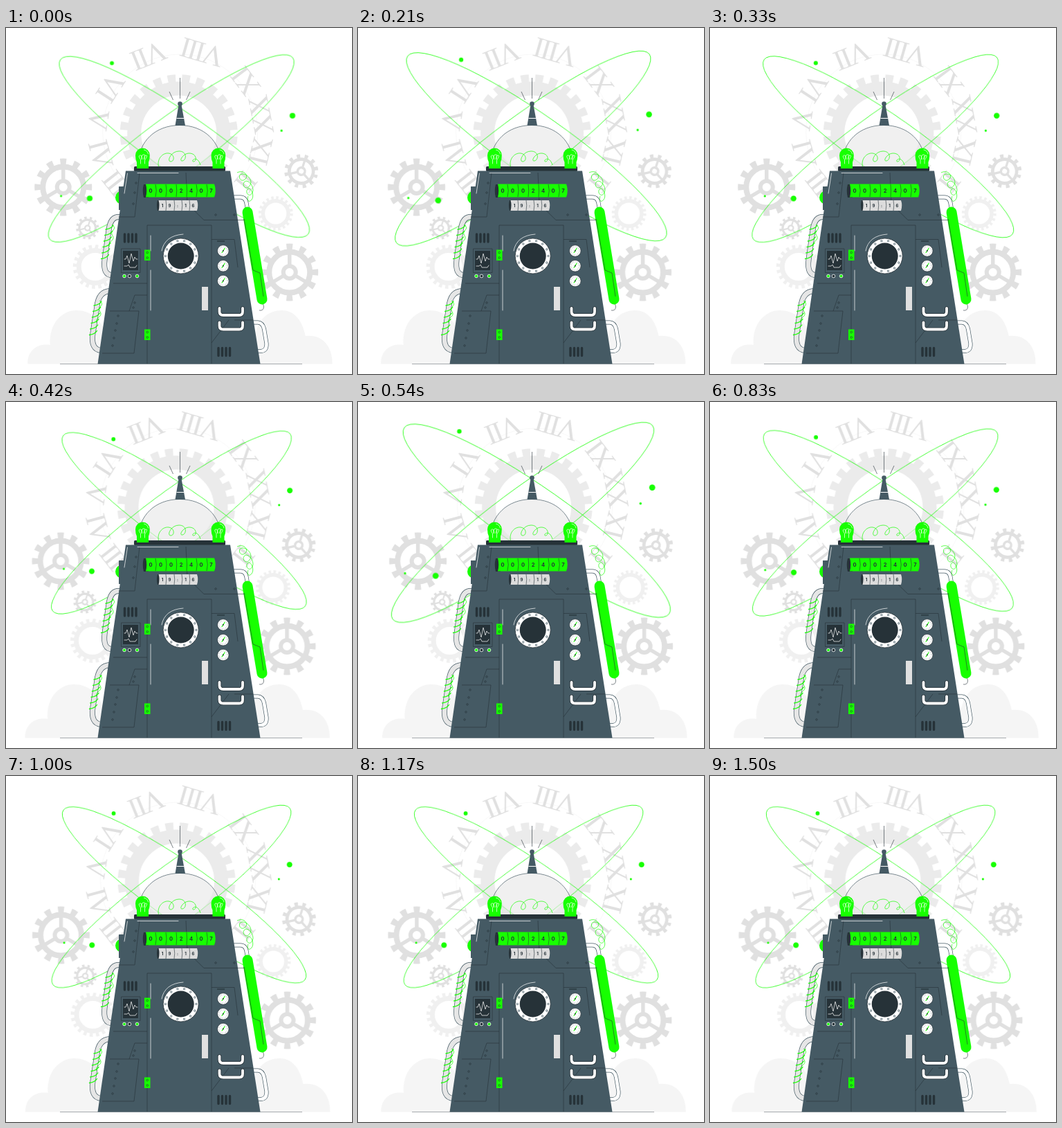
These frames come from a looping animation (500x500 px, 1.54 s). An HTML page without scripts:

```html
<!DOCTYPE html>
<html lang="en">
<head>
<meta charset="utf-8">
<title>Time machine</title>
<style>
  html, body { margin: 0; width: 100%; height: 100%; overflow: hidden; background: #fff; }
  svg { display: block; width: 100vw; height: 100vh; }

  .shake { animation: shake 1540ms cubic-bezier(.34, .07, .4, 1) -40ms infinite; }
  .beat { transform-origin: 250px 174px; animation: beat 1540ms linear -40ms infinite; }
  @keyframes shake {
    0%, 100% { transform: translateX(0); }
    10%, 90% { transform: translateX(-1px); }
    20%, 80% { transform: translateX(2px); }
    30%, 50%, 70% { transform: translateX(-4px); }
    40%, 60% { transform: translateX(4px); }
  }
  @keyframes beat {
    0%, 29.7%, 63%, 100% { transform: scale(1); }
    10%, 38% { transform: scale(1.1); }
  }

  .line { fill: none; stroke: #263238; stroke-width: .6; }
  .thin { fill: none; stroke: #17ff00; stroke-width: .7; }
  .coil { fill: none; stroke: #17ff00; stroke-width: 1.3; stroke-linecap: round; }
  .shine { fill: none; stroke: #fff; stroke-width: .7; stroke-linecap: round; }
  .green { fill: #17ff00; }
  .dark { fill: #263238; }
  .slate { fill: #455a64; }
  .numerals { font: 42px "Liberation Serif", serif; letter-spacing: -3px; fill: #e0e0e0; text-anchor: middle; }
  .digits { font: 700 7.5px Inter, sans-serif; fill: #263238; text-anchor: middle; }
  .small { font-size: 6px; }
  .tube { fill: none; }
</style>
</head>
<body>
<svg viewBox="0 0 500 500">
  <defs>
    <g id="wheel" fill="none" stroke="#e0e0e0">
      <circle r="29.5" stroke-width="8"/>
      <circle r="37" stroke-width="9" pathLength="12" stroke-dasharray=".45 .55" stroke-dashoffset=".225"/>
      <circle r="9" stroke-width="6"/>
      <path d="M0-11V-27M9.5 5.5 23 13.5M-9.5 5.5-23 13.5" stroke-width="5.5"/>
    </g>
    <g id="cog" fill="none" stroke="#f0f0f0">
      <circle r="23.5" stroke-width="7"/>
      <circle r="29" stroke-width="6" pathLength="20" stroke-dasharray=".5 .5"/>
    </g>
    <g id="bulb">
      <path class="green" d="M-8.5 203V194Q-10.5 190-10.5 184A10.3 10.5 0 0 1 10.3 184Q10.3 190 8.5 194V203Z"/>
      <path d="M-3 196V190Q-7 185-4 184T-1 190Q-3 184 1 183T2 190Q2 184 5 184T3 191V196" class="shine"/>
      <path d="M2 176Q7 177 8 182" class="shine"/>
    </g>
    <g id="gauge">
      <circle r="8.3" fill="#fff" stroke="#263238" stroke-width=".7"/>
      <circle r="6" fill="none" stroke="#9aa5aa" stroke-width="1.2" stroke-dasharray=".7 1.8"/>
      <path d="M-2 3 2.5-4" stroke="#17ff00" stroke-width="1.2"/>
      <circle r="1" class="dark"/>
    </g>
    <path id="bar" d="M308.500 405V410Q308.500 415 314 415H337Q342 415 342 410V405" fill="none" stroke-linecap="round"/>
    <g id="grip">
      <use href="#bar" stroke="#263238" stroke-width="5.5"/>
      <use href="#bar" stroke="#fff" stroke-width="3.8"/>
    </g>
    <path id="vents" d="M2 2V13M7.500 2V13M13 2V13M18.500 2V13" stroke="#263238" stroke-width="3.4" stroke-linecap="round"/>
    <g id="hinge">
      <rect width="8.5" height="15.5" class="green"/>
      <circle cx="4.2" cy="4" r="1.4" class="line"/>
      <circle cx="4.2" cy="11.5" r="1.4" class="line"/>
    </g>
    <path id="pipeTop" d="M164 273Q152 272 149 289L142.500 335Q140 357 153 357"/>
    <path id="pipeLow" d="M150 380Q134 381 131.500 402L125.500 441Q122 465 138 466"/>
    <path id="pipeRight" d="M328 244.500H338Q347 244 348 256L350 266M357 425.500H364Q371 426 373 435L376.500 456Q377 466 369 467H362"/>
    <path id="wraps" class="coil" d="M0 0q8-1 11-6m-12.300 14.500q8-1 11-6m-12.300 14.500q8-1 11-6m-12.300 14.500q8-1 11-6m-12.300 14.500q8-1 11-6m-12.300 14.500q8-1 11-6"/>
    <path id="loose" class="thin" d="M0 0q6 4 2 8t-1 8t-2 8t-3 8"/>
  </defs>

  <g class="shake">
    <path fill="#f5f5f5" d="M31.500 485.500C31 466 46 455 64 458C62 426 82 408 102 408C122 408 137 420 145 442L160 485.500Z"/>
    <path fill="#f5f5f5" d="M472 485.500C472 458 456 442 433 445C428 420 415 408 399 408C380 408 366 420 361 440L340 485.500Z"/>
    <circle cx="252" cy="150" r="112" fill="none" stroke="#f8f8f8"/>
    <g class="numerals" transform="translate(252 150)">
      <text transform="rotate(-128) translate(0 -133) rotate(180)">III</text>
      <text transform="rotate(-105) translate(0 -133) rotate(180)">IV</text>
      <text transform="rotate(-81) translate(0 -133) rotate(180)">V</text>
      <text transform="rotate(-57) translate(0 -133) rotate(180)">VI</text>
      <text transform="rotate(-22) translate(0 -133) rotate(180)">VII</text>
      <text transform="rotate(16) translate(0 -133) rotate(180)">VIII</text>
      <text transform="rotate(53) translate(0 -133) rotate(180)">XI</text>
      <text transform="rotate(79) translate(0 -133) rotate(180)">XX</text>
      <text transform="rotate(104) translate(0 -133) rotate(180)">IX</text>
      <text transform="rotate(128) translate(0 -133) rotate(180)">II</text>
    </g>
    <g transform="translate(250 152)" fill="none" stroke="#ebebeb">
      <circle r="64.5" stroke-width="20"/>
      <circle r="79" stroke-width="12" pathLength="24" stroke-dasharray=".55 .45" stroke-dashoffset="-.225"/>
    </g>
    <use href="#cog" transform="translate(129 345)"/>
    <use href="#cog" transform="translate(390 268) scale(.78)"/>
    <use href="#wheel" transform="translate(83 230)"/>
    <use href="#wheel" transform="translate(410 353)"/>
    <use href="#wheel" transform="translate(427 207) rotate(18) scale(.59)"/>
    <use href="#wheel" transform="translate(118 289) rotate(18) scale(.4)"/>
  </g>

  <g class="beat">
    <ellipse class="thin" rx="213.3" ry="42" transform="translate(257.500 171.800) rotate(35.100)"/>
    <ellipse class="thin" rx="213.5" ry="41.6" transform="translate(239 174) rotate(-36.700)"/>
    <g class="green">
      <circle cx="155.500" cy="54" r="2.9"/>
      <circle cx="409.700" cy="128" r="4"/>
      <circle cx="394.300" cy="149" r="1.6"/>
      <circle cx="124.300" cy="244.300" r="4"/>
      <circle cx="84" cy="241" r="1.5"/>
    </g>
  </g>

  <!-- dome and antenna -->
  <path d="M191 202V198C191 164 216 140.500 251 140.500S311 164 311 198V202Z" fill="#e6e6e6" fill-opacity=".6" stroke="#455a64" stroke-width=".7"/>
  <path class="thin" d="M221 202C217 190 226 180 235 181S244 193 238 193S238 178 250 178S261 191 255 192S256 180 266 181S276 193 271 193S276 182 281 198"/>
  <path class="slate" d="M244.500 141 249.500 111H253.500L259 141Z"/>
  <path d="M246.500 130.500H257" stroke="#fff"/>
  <circle cx="251.500" cy="109.500" r="3.3" class="slate"/>
  <path class="line" d="M251.500 72V102M236 92 241.500 104M266 92 260.500 104"/>
  <rect x="185" y="200" width="132" height="7" rx="1.5" class="dark"/>
  <use href="#bulb" x="197.500"/>
  <use href="#bulb" x="307"/>

  <!-- pipes -->
  <g class="tube" stroke="#455a64" stroke-width="8">
    <use href="#pipeTop"/>
    <use href="#pipeLow"/>
  </g>
  <g class="tube" stroke="#e6e6e6" stroke-width="6.6">
    <use href="#pipeTop"/>
    <use href="#pipeLow"/>
  </g>
  <use href="#wraps" x="144" y="291"/>
  <use href="#wraps" x="127" y="401"/>
  <use href="#loose" x="153" y="284"/>
  <use href="#loose" x="135" y="394"/>
  <use href="#pipeRight" class="tube" stroke="#455a64" stroke-width="6"/>
  <use href="#pipeRight" class="tube" stroke="#fff" stroke-width="4.6"/>
  <path class="line" d="M371 396 372.500 403Q372 409 366 408"/>
  <path class="thin" d="M334 209C344 204 352 214 345 219S334 212 341 211S358 220 352 228S340 226 345 222S360 230 356 238S345 238 349 233S360 242 355 248S348 247 350 243"/>
  <circle cx="168" cy="245" r="10" class="green"/>
  <rect x="163" y="229" width="10" height="34" class="slate"/>

  <!-- body -->
  <path d="M78 485.500H428" stroke="#263238" stroke-width=".4"/>
  <path class="slate" d="M173 206.500H324L367.500 485.500H132.500Z"/>
  <path d="M349 266 370 392" stroke="#17ff00" stroke-width="15" stroke-linecap="round"/>
  <path class="line" d="M344 276 357 350 367 354 372 388"/>
  <path class="line" d="M193 209 186 273H163M260 209 262 254 286 277.500H344M204 485V285H297V485M297 305.500H330L335 346M155 369H204M150 409H192L185 470H139M178 409 186 386H204M330 422H357M297 455 322 422"/>
  <path class="shine" d="M171 239 175.500 210M190 209.500H249M209 350V408M209 322V300"/>
  <path d="M305 308H316" stroke="#263238" stroke-width="1.2"/>
  <g class="line">
    <circle cx="188" cy="224" r="1.3"/><circle cx="186" cy="238" r="1.3"/><circle cx="184" cy="254" r="1.3"/>
    <circle cx="303" cy="270" r="1.3"/><circle cx="330" cy="270" r="1.3"/>
    <circle cx="162" cy="416" r="1.3"/><circle cx="160" cy="427" r="1.3"/><circle cx="158" cy="437" r="1.3"/>
    <circle cx="156" cy="448" r="1.3"/><circle cx="154" cy="459" r="1.3"/>
    <circle cx="186" cy="397" r="1.3"/><circle cx="184" cy="404" r="1.3"/>
  </g>

  <!-- counters -->
  <path class="dark" d="M199 226H206V245H199Q196.500 235 199 226Z"/>
  <path class="green" d="M202 225.500H301Q304.500 235 301 244.500H202Q204.500 235 202 225.500Z"/>
  <path class="line" d="M216 226Q218.500 235 216 244M231 226Q233 235 231 244M246 226Q247.500 235 246 244M261 226Q262 235 261 244M275 226Q277.500 235 275 244M290 226Q292.500 235 290 244"/>
  <g class="digits">
    <text y="238" x="209">0</text><text y="238" x="223.500">0</text><text y="238" x="238.500">0</text><text y="238" x="253">2</text>
    <text y="238" x="267.500">4</text><text y="238" x="282">0</text><text y="238" x="296.500">7</text>
  </g>
  <path class="dark" d="M219 249H223V264H219Q217 256 219 249Z"/>
  <path fill="#dcdcdc" d="M220.500 249H276Q278.500 256 276 264H220.500Q222.500 256 220.500 249Z"/>
  <path class="line" d="M231 249Q232.500 256 231 264M243 249Q244.500 256 243 264M254 249Q255.500 256 254 264M265 249Q266.500 256 265 264"/>
  <g class="digits small">
    <text y="258.500" x="226">1</text><text y="258.500" x="236.500">9</text><text y="258.500" x="248">:</text>
    <text y="258.500" x="259.500">1</text><text y="258.500" x="270.500">6</text>
  </g>

  <!-- screen, vents and door -->
  <use href="#vents" x="169.500" y="296"/>
  <use href="#vents" x="305" y="460.500"/>
  <path class="line" d="M166.500 319H194V353.500H166.500Z"/>
  <rect x="169" y="322" width="22" height="28" class="dark"/>
  <path class="shine" d="M171 334H173L175 329 178 340 181 326 184 337 186 331 188 334H190M171 344H175L177 342 179 346H187L189 343"/>
  <g stroke="#fff" stroke-width=".8">
    <circle cx="171" cy="358.500" r="2.3" class="green"/>
    <circle cx="178.500" cy="358.500" r="2.3" class="dark"/>
    <circle cx="189.500" cy="358.500" r="2.3" class="green"/>
  </g>
  <use href="#hinge" x="200" y="320.500"/>
  <use href="#hinge" x="200" y="435.500"/>
  <path d="M225 322Q229 300 256 298" class="shine"/>
  <g transform="translate(252.700 329.500)">
    <circle r="25.5" fill="#fff" stroke="#263238" stroke-width=".8"/>
    <g fill="none" stroke-linecap="round">
      <circle r="22.3" stroke="#455a64" stroke-width="3" pathLength="14" stroke-dasharray=".01 .99"/>
      <circle r="22.3" stroke="#fff" stroke-width="1.6" pathLength="14" stroke-dasharray=".01 .99"/>
    </g>
    <circle r="19" class="dark"/>
  </g>
  <rect x="283" y="374" width="9" height="34" fill="#e0e0e0"/>
  <use href="#gauge" x="313.800" y="322"/>
  <use href="#gauge" x="313.800" y="343.800"/>
  <use href="#gauge" x="313.800" y="365.500"/>
  <use href="#grip"/>
  <use href="#grip" y="20.500"/>
</svg>
</body>
</html>
```
